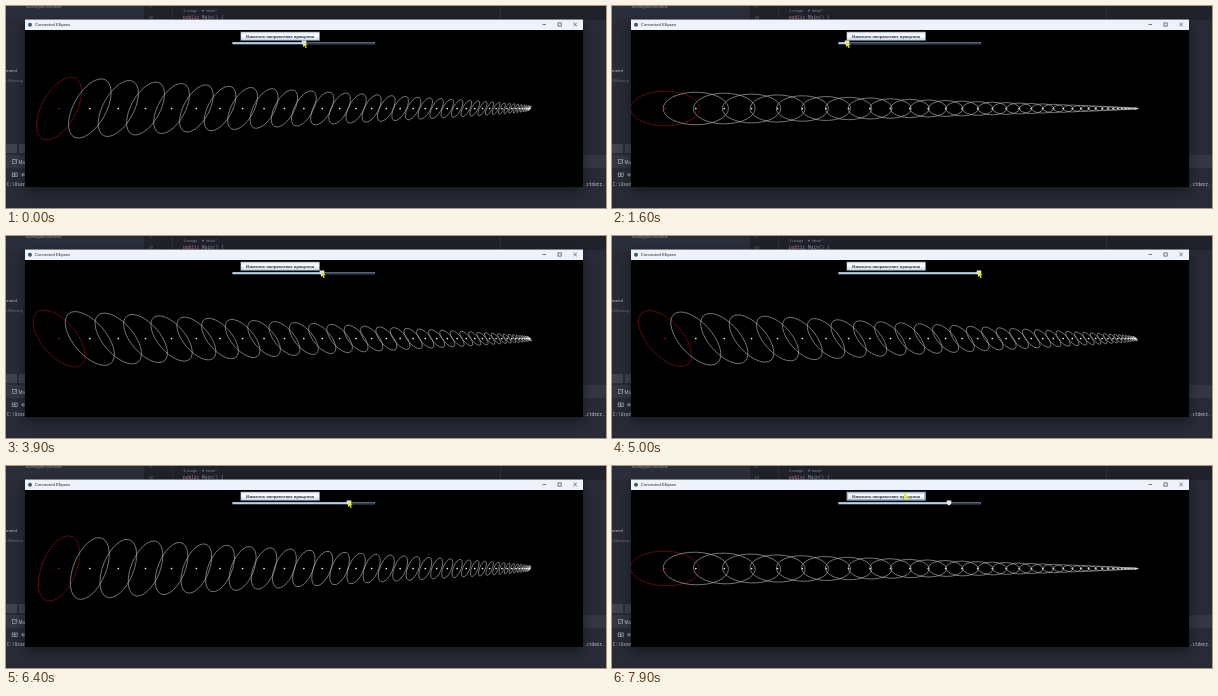
Animation of 600x202 px, one loop 8000 ms. Source, as an HTML page with a canvas:

```html
<!DOCTYPE html>
<html lang="ru">
<head>
<meta charset="utf-8">
<title>Connected Ellipses</title>
<style>
html, body { margin: 0; width: 600px; height: 202px; overflow: hidden; background: #282b36; }
canvas { display: block; }
</style>
</head>
<body>
<canvas id="stage" width="600" height="202"></canvas>
<script>
const ctx = document.getElementById('stage').getContext('2d');
const LOOP = 8000, STEP = 100, CENTER_Y = 102.5;
const TRACK_X = 226.5, TRACK_W = 142.5, TOP_SPEED = 0.2048; // degrees per ms
const SANS = '"Liberation Sans", Arial, sans-serif';
const MONO = '"Noto Sans Mono", "DejaVu Sans Mono", monospace';

function ease(t, from, to) {
  const u = Math.min(1, Math.max(0, (t - from) / (to - from)));
  return u * u * (3 - 2 * u);
}

// The thumb is dragged to the left end, to the right end, and back a little.
function sliderX(t) {
  return 298 - 63 * ease(t, 0, 914) + 81 * ease(t, 3535, 3900) + 51 * ease(t, 3990, 5000)
    - 24 * ease(t, 5000, 5580) - 6 * ease(t, 7650, 7750);
}

// The slider sets the speed, so the angle is its running sum.
function angleAt(t) {
  const dt = 10;
  let angle = -61;
  for (let s = dt / 2; s < t; s += dt) {
    angle += TOP_SPEED * dt * (sliderX(s) - TRACK_X) / TRACK_W;
  }
  return angle;
}

// Spacing and both half-axes shrink by about 5% per link, less a small constant.
const links = [];
for (let n = 0, x = 53; n < 38; n++) {
  if (n) x += 44.8 * 0.971 ** (n - 1) - 15 + (n === 1);
  links.push({
    x,
    a: 37.5 * 0.95 ** n - 3,
    b: Math.max(0.2, 20.8 * 0.9515 ** n - 3.5)
  });
}

function rect(x, y, w, h, color) {
  ctx.fillStyle = color;
  ctx.fillRect(x, y, w, h);
}

function text(str, x, y, size, color, font = SANS, weight = '') {
  ctx.font = `${weight} ${size}px ${font}`;
  ctx.fillStyle = color;
  ctx.fillText(str, x, y);
}

function box(x, y, w, h, color, width = 0.7) {
  ctx.strokeStyle = color;
  ctx.lineWidth = width;
  ctx.strokeRect(x, y, w, h);
}

function line(x1, y1, x2, y2, color) {
  ctx.beginPath();
  ctx.moveTo(x1, y1);
  ctx.lineTo(x2, y2);
  ctx.strokeStyle = color;
  ctx.lineWidth = 0.7;
  ctx.stroke();
}

function dot(x, y, r, color) {
  ctx.beginPath();
  ctx.arc(x, y, r, 0, 7);
  ctx.fillStyle = color;
  ctx.fill();
}

function shape(x, y, points, color) {
  ctx.beginPath();
  points.forEach(([dx, dy]) => ctx.lineTo(x + dx, y + dy));
  ctx.closePath();
  ctx.fillStyle = color;
  ctx.fill();
}

function drawEditor() {
  rect(0, 0, 600, 202, '#282b36');
  rect(0, 0, 138, 14, '#2a2e3b');
  rect(138, 0, 462, 14, '#20222b');
  rect(166, 0, 0.6, 14, '#353841');
  rect(494, 0, 0.6, 14, '#3a3d48');
  text('aDesignerJar.idea', 20, 1.6, 4.4, '#8f939c');
  text('9', 143, 1.6, 4.2, '#666a73', MONO);
  text('10', 142, 13, 4.2, '#666a73', MONO);
  text('1 usage', 177, 6, 4, '#7c808a');
  dot(197, 4.6, 0.9, '#7c808a');
  text('lotvin*', 200, 6, 4, '#7c808a');
  text('public', 177, 13.2, 4.5, '#c07a9a', MONO);
  text('Main() {', 196, 13.2, 4.5, '#8f93a8', MONO);

  text('mend', 0, 65.5, 4.4, '#b9bcc4');
  text('t Messag', 0, 75.5, 4.2, '#6d717a');
  rect(0, 138, 11, 9, '#40434d');
  rect(13, 138, 6, 9, '#40434d');
  rect(0, 149, 600, 13, '#343742');
  box(6.5, 153.5, 4, 4, '#9da1aa');
  line(8.5, 156, 11.3, 153.2, '#9da1aa');
  text('Main', 12.5, 157.5, 4.6, '#c8cbd2');
  box(6.2, 167, 5, 3.5, '#a9adb5');
  dot(8.7, 168.8, 1, '#a9adb5');
  dot(17, 168.8, 1.8, '#7c808a');
  text('C:\\Users', 0.8, 180, 4.4, '#c3c6cd', MONO);
  text('t.stderr.', 575, 180, 4.4, '#c3c6cd', MONO);
}

function drawWindow() {
  ctx.save();
  ctx.shadowColor = 'rgba(0, 0, 0, 0.45)';
  ctx.shadowBlur = 12;
  ctx.shadowOffsetY = 4;
  rect(19, 13.5, 558, 167.5, '#000');
  ctx.restore();
  rect(19, 13.5, 558, 10.5, '#eef2fa');
  dot(24, 18.7, 2, '#3f5872');
  text('Connected Ellipses', 29, 20.4, 4.1, '#222');
  line(536.5, 18.5, 540, 18.5, '#444');
  box(552, 16.9, 3.2, 3.2, '#444');
  line(567.4, 16.8, 570.8, 20.2, '#444');
  line(570.8, 16.8, 567.4, 20.2, '#444');
}

function drawControls(x, hover) {
  const face = ctx.createLinearGradient(0, 26, 0, 35);
  face.addColorStop(0, '#dce7f2');
  face.addColorStop(0.4, '#fff');
  face.addColorStop(1, '#b8cfe5');
  rect(234.5, 25.7, 79.3, 9, '#7a8a99');
  rect(235.1, 26.3, 78.1, 7.8, face);
  if (hover) box(235.6, 26.8, 77.1, 6.8, '#94b4d3', 0.9);
  text('Изменить направление вращения', 240, 31.8, 4.05, '#30343a', SANS, 'bold');

  rect(TRACK_X, 36, TRACK_W, 2.3, '#71849a');
  rect(TRACK_X + 0.5, 36.7, TRACK_W - 1, 0.9, '#10151c');
  rect(TRACK_X, 36.2, x - TRACK_X, 1.9, '#b8cfe5');
  shape(x, 34.5, [[-2.3, 0], [2.3, 0], [2.3, 3.1], [0, 5.3], [-2.3, 3.1]], '#e3edf7');
}

function drawLinks(angle) {
  ctx.save();
  ctx.beginPath();
  ctx.rect(19, 24, 558, 157);
  ctx.clip();
  ctx.lineWidth = 0.65;
  links.forEach(({ x, a, b }, n) => {
    ctx.beginPath();
    ctx.ellipse(x, CENTER_Y, a, b, angle, 0, 2 * Math.PI);
    ctx.strokeStyle = n ? '#b4b4b4' : '#941010';
    ctx.stroke();
    dot(x, CENTER_Y, 0.85, n ? '#f4f4f4' : '#a81010');
  });
  ctx.restore();
}

function drawPointer(x, y) {
  shape(x, y, [[0, 0], [0, 6], [1.5, 4.8], [2.6, 7.2], [3.7, 6.6], [2.7, 4.3], [4.7, 4.2]], '#e2e83c');
}

function draw() {
  const t = Math.floor(performance.now() % LOOP / STEP) * STEP;
  const x = sliderX(t), leave = ease(t, 7700, 7900);
  drawEditor();
  drawWindow();
  drawControls(x, leave > 0.5);
  drawLinks(angleAt(t) * Math.PI / 180);
  drawPointer(x - 1 - 44 * leave, 35 - 8 * leave);
  requestAnimationFrame(draw);
}
draw();
</script>
</body>
</html>
```
